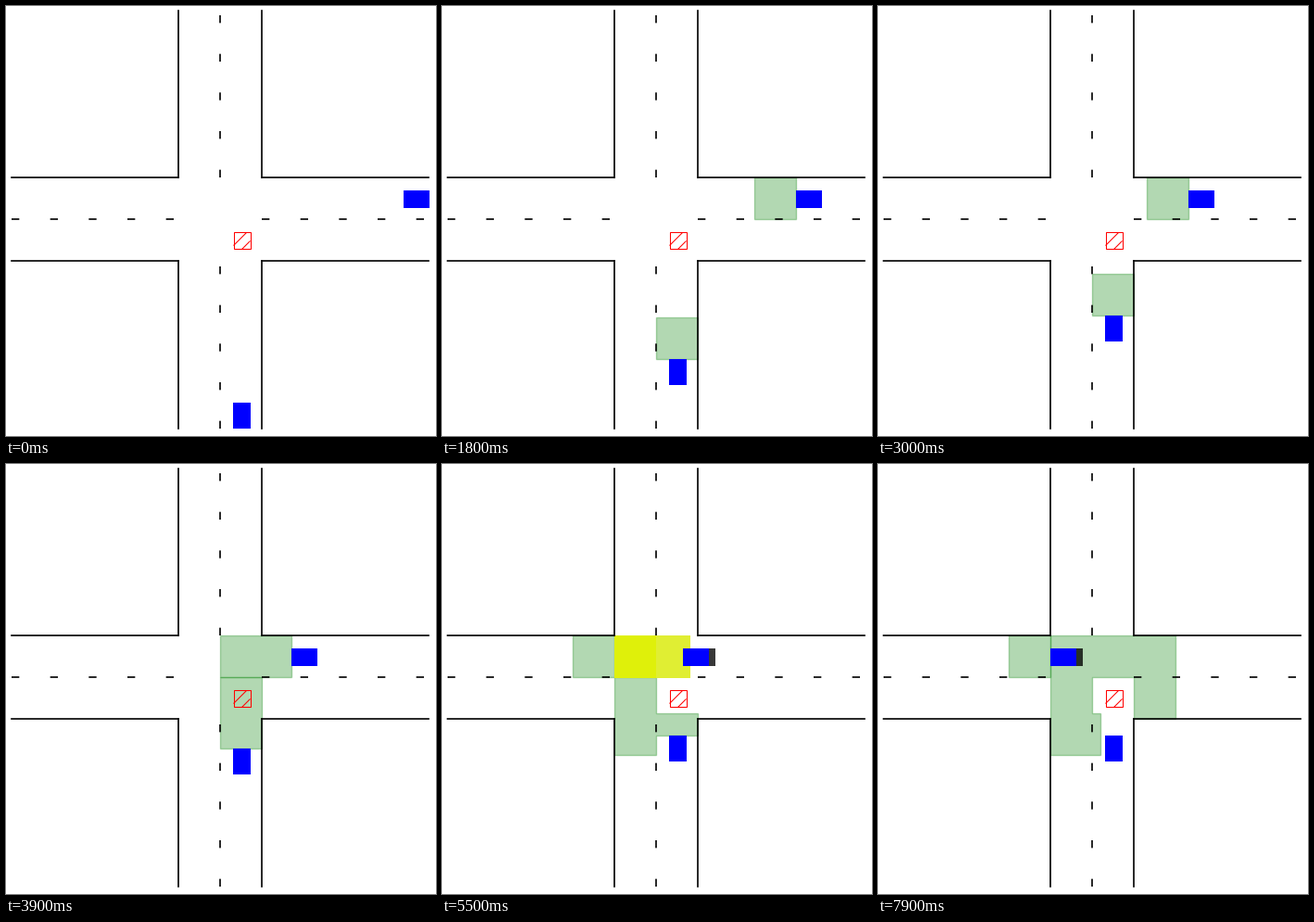
A matplotlib script that plays this animation: 464x464 px, repeating every 8 s.

```python
import matplotlib.pyplot as plt
from matplotlib.animation import FuncAnimation
from matplotlib.patches import Polygon, Rectangle

SIZE, DPI = 464, 100
INTERVAL, FRAMES = 100, 80
LANE = 45
STEP = 0.15 * LANE
WEST, MID_X, EAST = 186, 231, 276
NORTH, MID_Y, SOUTH = 185, 230, 275
LOW, HIGH_X, TOP, BOTTOM = 6, 456, 5, 456

# Ticks (100 ms each) at which the simulation advances
TICKS = [3, 5, 7, 9, 11, 13, 16, 18, 19, 21, 23, 25, 27, 28, 30, 32, 34,
         37, 39, 41, 43, 45, 48, 50, 52, 55, 57, 59, 61, 64, 66, 68,
         71, 73, 75, 77, 79]
ENTER, STOP, CLAIM, REPLAN, RELEASE = 17, 20, 24, 28, 32

# The small margin keeps the pixel size from being truncated
inches = (SIZE + 0.01) / DPI
fig = plt.figure(figsize=(inches, inches), dpi=DPI, facecolor="white")
ax = fig.add_axes([0, 0, 1, 1])
ax.set_xlim(0, SIZE)
ax.set_ylim(SIZE, 0)
ax.axis("off")


def road_line(x, y, **style):
    ax.plot(x, y, color="black", lw=1.2, zorder=2, **style)


def draw_roads():
    for x in (WEST, EAST):
        road_line([x, x], [NORTH, TOP])
        road_line([x, x], [BOTTOM, SOUTH])
    for y in (NORTH, SOUTH):
        road_line([LOW, WEST], [y, y])
        road_line([EAST, HIGH_X], [y, y])
    dashed = dict(dashes=(5, 20))
    road_line([MID_X, MID_X], [NORTH, TOP], **dashed)
    road_line([MID_X, MID_X], [BOTTOM, SOUTH], **dashed)
    road_line([LOW, WEST], [MID_Y, MID_Y], **dashed)
    road_line([EAST, HIGH_X], [MID_Y, MID_Y], **dashed)


def draw_obstacle():
    left, right, top, bottom = 245.5, 263.5, 244.5, 262.5
    ax.add_patch(Rectangle((left, top), right - left, bottom - top,
                           fill=False, ec="red", lw=0.75, zorder=3))
    for total in (504, 517):
        x0 = max(left, total - bottom)
        x1 = min(right, total - top)
        ax.plot([x0, x1], [total - x0, total - x1], color="red", lw=0.75,
                solid_capstyle="butt", zorder=3)


draw_roads()
draw_obstacle()
moving = []


def add(patch):
    moving.append(ax.add_patch(patch))


def box(x0, y0, x1, y1, color, **style):
    add(Rectangle((x0, y0), x1 - x0, y1 - y0, fc=color, **style))


def zone(points):
    add(Polygon(points, closed=True, color="green", alpha=0.3, lw=1, zorder=1))


def zone_box(x0, y0, x1, y1):
    zone([(x0, y0), (x1, y0), (x1, y1), (x0, y1)])


def car_left(moves):
    return 429 - STEP * moves


def draw_zones(moves, front_a, front_b):
    if moves < STOP:
        ahead_a, ahead_b = front_a - LANE, front_b - LANE
        if moves >= ENTER:
            ahead_a, ahead_b = MID_X, MID_Y
        zone_box(ahead_a, NORTH, front_a, MID_Y)
        zone_box(MID_X, ahead_b, EAST, front_b)
        return

    upper, lower = front_b - 24.5, front_b + 20.5
    if moves < REPLAN:
        zone([(MID_X, MID_Y), (MID_X, upper), (EAST, upper), (EAST, front_b),
              (MID_X, front_b), (MID_X, lower), (WEST, lower), (WEST, MID_Y)])
    else:
        edge = car_left(REPLAN)
        far = EAST + LANE
        zone([(WEST, NORTH), (far, NORTH), (far, SOUTH), (EAST, SOUTH),
              (EAST, MID_Y), (MID_X, MID_Y), (MID_X, upper), (edge, upper),
              (edge, lower), (WEST, lower)])
    zone_box(WEST - LANE, NORTH, front_a if moves < CLAIM else WEST, MID_Y)

    if CLAIM <= moves < RELEASE:
        edge = car_left(CLAIM if moves < REPLAN else REPLAN)
        box(WEST, NORTH, MID_X, MID_Y + 1, (0.875, 0.94, 0.04), lw=0, zorder=1.2)
        box(MID_X, NORTH, edge + 1, MID_Y + 1, (0.88, 0.935, 0.2), lw=0, zorder=1.2)


def update(frame):
    for patch in moving:
        patch.remove()
    moving.clear()

    moves = sum(tick <= frame for tick in TICKS) - 1
    front_a = car_left(max(moves, 0))
    front_b = 428.5 - STEP * min(max(moves, 0), STOP)
    if moves >= 0:
        draw_zones(moves, front_a, front_b)
    if moves >= CLAIM:
        box(front_a + STEP, 199, front_a + STEP + 28, 218, "black",
            alpha=0.78, lw=0, zorder=1.4)
    box(front_a, 199, front_a + 28, 218, "blue", lw=0, zorder=1.6)
    box(245, front_b, 264, front_b + 28, "blue", lw=0, zorder=1.6)
    return moving


anim = FuncAnimation(fig, update, frames=FRAMES, interval=INTERVAL,
                     init_func=lambda: update(0), repeat=True,
                     repeat_delay=0, blit=False)
plt.show()
```
